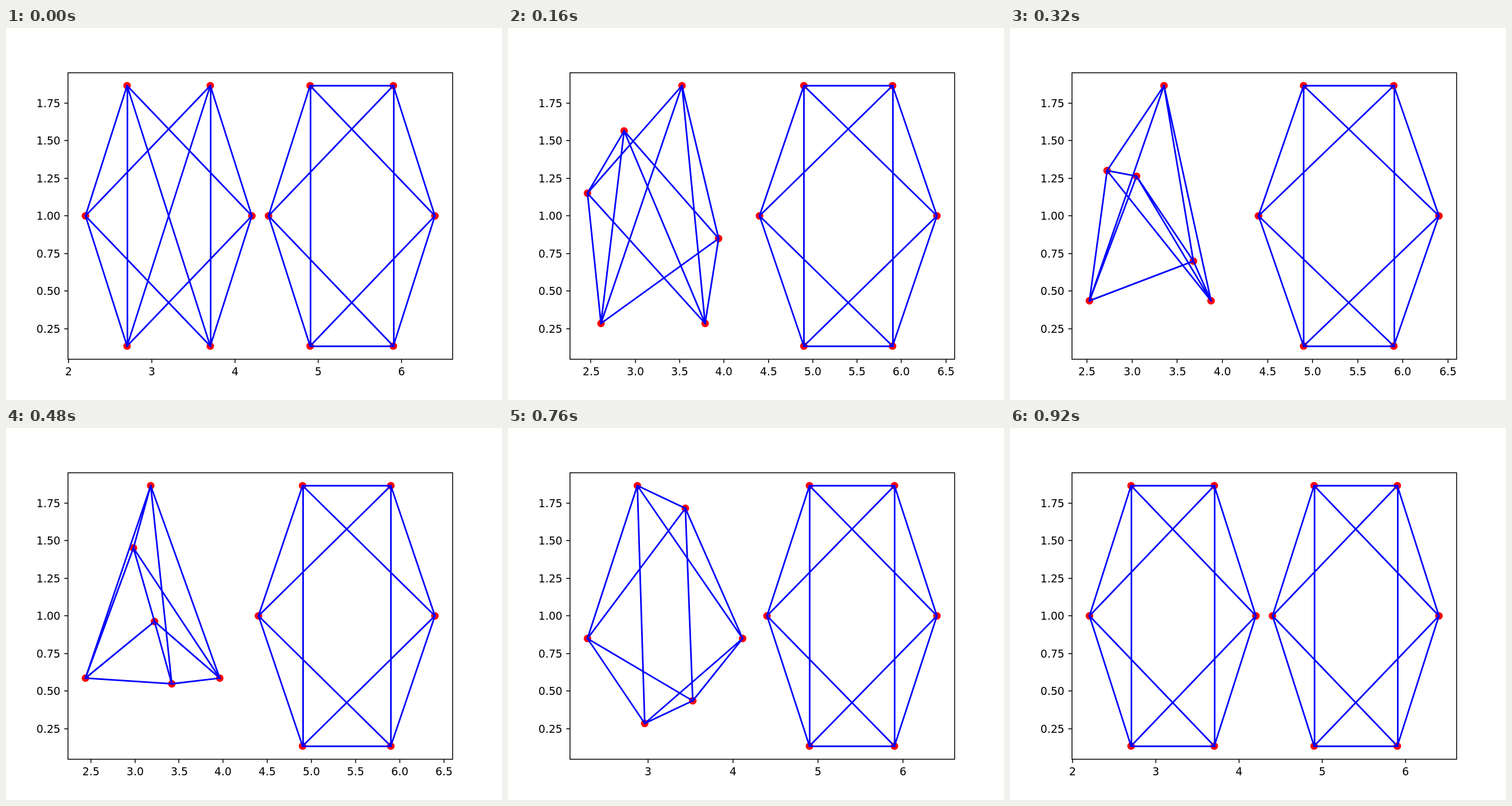
Recreate the animation shown at these times as an HTML page with a canvas. Size 864x648 px, loop 960 ms.

```html
<!DOCTYPE html>
<html lang="en">
<head>
<meta charset="utf-8">
<title>Octahedral graph isomorphism</title>
<style>
  html, body { margin: 0; width: 100%; height: 100%; overflow: hidden; background: #fff; }
  canvas { display: block; }
</style>
</head>
<body>
<canvas id="stage" width="864" height="648"></canvas>
<script>
const ctx = document.getElementById('stage').getContext('2d');
const STEP_MS = 40, STEPS = 24;
const LEFT = 108, RIGHT = 777.6, TOP = 77.76, BOTTOM = 576.72;
const PT = 135 / 72;
const MARGIN = 0.05;

// Hexagon corner number k (60 degrees each), counter-clockwise from the right
const corner = (cx, k) => [cx + Math.cos(k * Math.PI / 3), 1 + Math.sin(k * Math.PI / 3)];
const startCorners = [5, 3, 1, 4, 0, 2];
const endCorners = [0, 1, 2, 3, 4, 5];
const place = (cx, corners) => corners.map(k => corner(cx, k));
const from = place(3.2, startCorners), to = place(3.2, endCorners);
const fixed = place(5.4, endCorners);

// Every pair is joined except opposite corners
const edges = [];
for (let i = 0; i < 6; i++)
  for (let j = i + 1; j < 6; j++)
    if (j - i !== 3) edges.push([i, j]);

// Scale that fits [min, max] plus a margin between two pixel positions
function fit(min, max, a, b) {
  const pad = (max - min) * MARGIN, lo = min - pad, hi = max + pad;
  return { lo, hi, at: v => a + (v - lo) / (hi - lo) * (b - a) };
}

function line(x1, y1, x2, y2) {
  ctx.beginPath();
  ctx.moveTo(x1, y1);
  ctx.lineTo(x2, y2);
  ctx.stroke();
}

function label(text, x, baseline, align) {
  ctx.fillText(text, Math.round(x - ctx.measureText(text).width * align), baseline);
}

function drawGraph(points) {
  ctx.fillStyle = '#f00';
  for (const [x, y] of points) {
    ctx.beginPath();
    ctx.arc(x, y, 3.5 * PT, 0, 2 * Math.PI);
    ctx.fill();
  }
  ctx.strokeStyle = '#00f';
  ctx.lineWidth = 1.5 * PT;
  ctx.lineCap = 'square';
  const snap = v => Math.round(v) + 0.5;
  for (const [i, j] of edges) {
    let [x1, y1] = points[i], [x2, y2] = points[j];
    if (Math.abs(x1 - x2) < 1e-6 || Math.abs(y1 - y2) < 1e-6)
      [x1, y1, x2, y2] = [x1, y1, x2, y2].map(snap);
    line(x1, y1, x2, y2);
  }
}

function drawAxes(sx, sy) {
  const left = Math.round(LEFT), bottom = Math.round(BOTTOM), tick = 3.5 * PT;
  ctx.strokeStyle = ctx.fillStyle = '#000';
  ctx.lineWidth = 0.8 * PT;
  ctx.lineCap = 'butt';
  ctx.font = `${10 * PT}px "DejaVu Sans", sans-serif`;
  ctx.strokeRect(left, Math.round(TOP), Math.round(RIGHT) - left, bottom - Math.round(TOP));

  const step = sx.hi - sx.lo > 4.5 ? 1 : 0.5;
  for (let v = Math.ceil(sx.lo / step) * step; v <= sx.hi; v += step) {
    const x = Math.round(sx.at(v));
    line(x, bottom, x, bottom + tick);
    label(v.toFixed(step < 1 ? 1 : 0), sx.at(v), 605, 0.5);
  }
  for (let v = 0.25; v <= sy.hi; v += 0.25) {
    const y = Math.round(sy.at(v));
    line(left, y, left - tick, y);
    label(v.toFixed(2), LEFT - 2 * tick, y + 7, 1);
  }
}

function draw(now) {
  const p = Math.floor(now / STEP_MS) % STEPS / (STEPS - 1);
  const moving = from.map(([x, y], i) => [x + (to[i][0] - x) * p, y + (to[i][1] - y) * p]);
  const all = [...moving, ...fixed];
  const xs = all.map(q => q[0]), ys = all.map(q => q[1]);
  const sx = fit(Math.min(...xs), Math.max(...xs), LEFT, RIGHT);
  const sy = fit(Math.min(...ys), Math.max(...ys), BOTTOM, TOP);

  ctx.fillStyle = '#fff';
  ctx.fillRect(0, 0, 864, 648);
  for (const graph of [moving, fixed])
    drawGraph(graph.map(([x, y]) => [sx.at(x), sy.at(y)]));
  drawAxes(sx, sy);
}

const began = performance.now();
function frame() {
  draw(performance.now() - began);
  requestAnimationFrame(frame);
}
frame();
</script>
</body>
</html>
```
